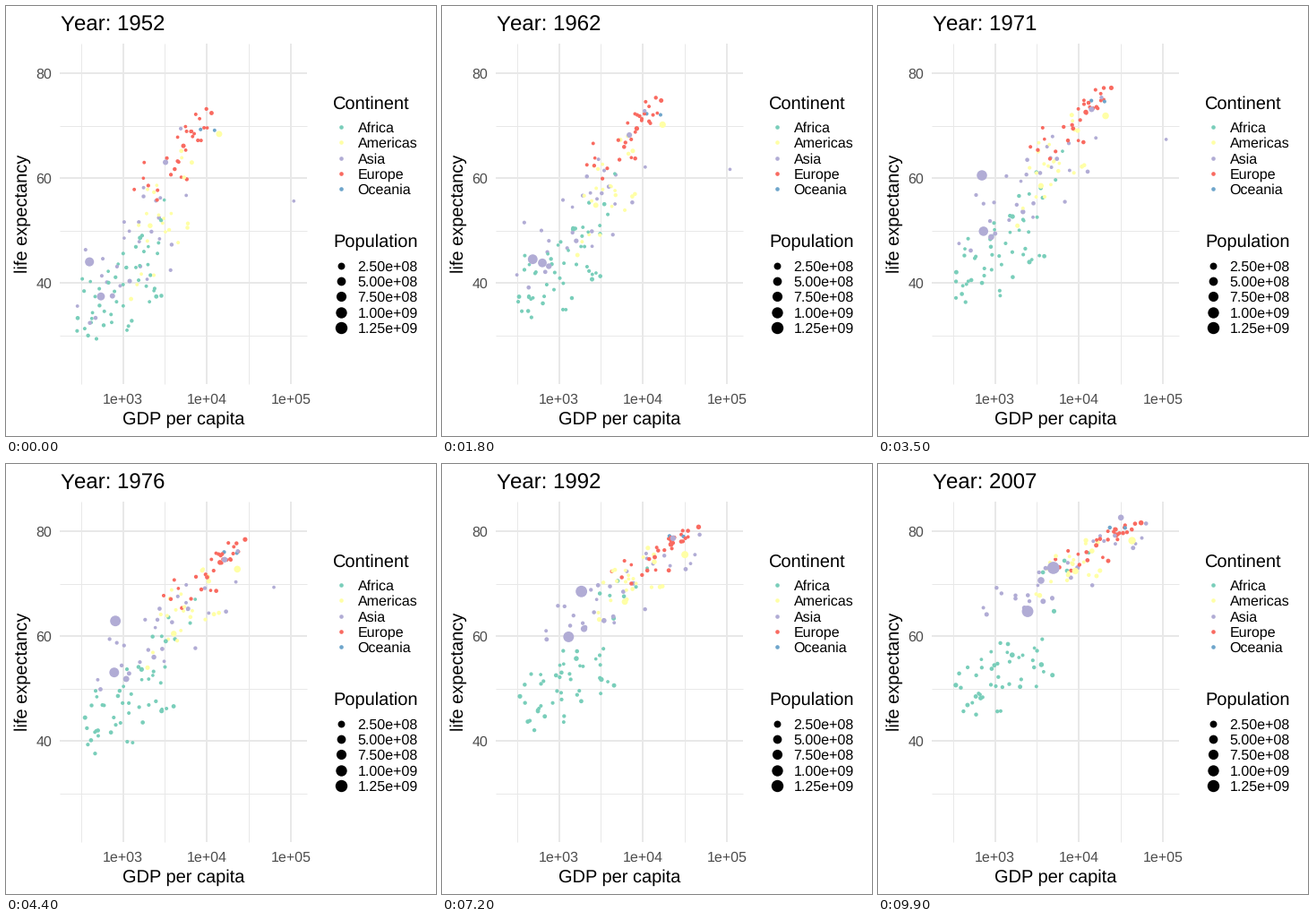
Write a matplotlib script that moves like this. It is 480 by 480 pixels and loops after 10 s.

```python
import numpy as np
import matplotlib.pyplot as plt
from matplotlib.animation import FuncAnimation

plt.rcParams.update({"font.family": "Liberation Sans", "text.hinting": "none"})

FRAMES = 100
YEARS = np.arange(1952, 2008, 5)
COLORS = {
    "Africa": "#79ceba",
    "Americas": "#ffffa6",
    "Asia": "#b1acd5",
    "Europe": "#f96a60",
    "Oceania": "#6ea5cb",
}
GREY = "#e8e8e8"

# Regions: continent, countries, mean (log GDP, life) in the first and last
# year, and the spread of both.
REGIONS = [
    ("Africa", 46, (2.97, 38.5), (3.12, 53), (.31, 6)),
    ("Africa", 6, (3.27, 46), (3.82, 73.3), (.14, 4.5)),
    ("Americas", 23, (3.47, 52), (3.90, 73.3), (.22, 7.5)),
    ("Asia", 20, (3.02, 44.5), (3.50, 69), (.33, 7)),
    ("Asia", 8, (3.42, 54), (4.47, 78.4), (.22, 8)),
    ("Europe", 18, (3.84, 68.2), (4.49, 79.9), (.13, 2.7)),
    ("Europe", 12, (3.48, 61), (4.06, 75.1), (.21, 3.8)),
    ("Oceania", 2, (4.01, 69.2), (4.47, 80.7), (.05, .4)),
]

# Countries that stand out: continent, population in millions in the first and
# last year, and key points (year, GDP per capita, life expectancy).
STANDOUTS = [
    ("Americas", (57, 190), [(1952, 2109, 50.9), (2007, 9066, 72.4)]),
    ("Asia", (556, 1319), [(1952, 400, 44), (1962, 488, 44.5),
                           (1967, 613, 58.4), (1982, 962, 65.5),
                           (2007, 4959, 73)]),
    ("Asia", (372, 1110), [(1952, 547, 37.4), (1982, 856, 56.6),
                           (2007, 2452, 64.7)]),
    ("Asia", (82, 223), [(1952, 750, 37.5), (1967, 762, 46),
                         (2007, 3541, 70.6)]),
    ("Asia", (86, 127), [(1952, 3217, 63), (1972, 14779, 73.4),
                         (2007, 31656, 82.6)]),
    ("Asia", (1, 2), [(1952, 108382, 55.6), (1972, 109348, 67.7),
                      (1982, 31354, 71.3), (2007, 47307, 77.6)]),
    ("Americas", (157, 301), [(1952, 13990, 68.4), (2007, 42952, 78.2)]),
]

rng = np.random.default_rng(7)


def drifting(n, step=.1):
    """Standard scores of n countries that wander a little every five years."""
    start = rng.permutation(np.linspace(-1.6, 1.6, n))[:, None]
    return start + np.cumsum(rng.normal(0, step, (n, len(YEARS))), axis=1)


def ramp(first, last):
    return np.linspace(first, last, len(YEARS))


def region(cont, n, start, end, spread):
    """Countries around a mean that rises fast at first, then levels off."""
    rise = 1 - (1 - ramp(0, 1)) ** 1.5
    gdp, life = (a + (b - a) * rise for a, b in zip(start, end))
    shrink = (85 - life) / (85 - start[1])
    u = drifting(n)
    x = gdp + spread[0] * u
    y = life + spread[1] * shrink * (.6 * u + .8 * drifting(n))
    pop = np.minimum(7 * np.exp(rng.normal(size=n)), 50)
    return [(cont, x[k], y[k], pop[k] * ramp(.7, 1.6)) for k in range(n)]


def standout(cont, pop, points):
    year, gdp, life = np.transpose(points)
    return (cont, np.interp(YEARS, year, np.log10(gdp)),
            np.interp(YEARS, year, life), ramp(*pop))


def px(log_gdp):
    return 130.5 + 93.75 * (log_gdp - 3)


def py(life):
    return 75 + 5.85 * (80 - life)


def area(pop):
    """Marker area for a population in millions."""
    return (3.4 + 10.3 * np.sqrt(pop / 1319)) ** 2


crowd = [c for r in REGIONS for c in region(*r)]
rows = [crowd[k] for k in rng.permutation(len(crowd))]
rows += [standout(*s) for s in STANDOUTS]
gdp, life, pop = (np.array([r[k] for r in rows]) for k in (1, 2, 3))

fig = plt.figure(figsize=(480 / 72, 480 / 72), dpi=72, facecolor="white")
ax = fig.add_axes([0, 0, 1, 1])
ax.set(xlim=(0, 480), ylim=(480, 0))
ax.axis("off")


def text(x, y, s, size=16, **kw):
    return ax.text(x, y, s, fontsize=size, va="baseline", **kw)


def grid(logs, lives, width):
    style = dict(color=GREY, lw=width, zorder=1)
    ax.vlines([px(v) for v in logs], 42, 421.5, **style)
    ax.hlines([py(v) for v in lives], 60, 335.5, **style)


grid([2.5, 3.5, 4.5], [30, 50, 70], .97)
grid([3, 4, 5], [40, 60, 80], 1.94)
for k in (3, 4, 5):
    text(px(k), 444, f"1e+0{k}", ha="center", color="#4d4d4d")
for v in (40, 60, 80):
    text(51, py(v) + 5.8, str(v), ha="right", color="#4d4d4d")
text(198, 466.5, "GDP per capita", 20, ha="center")
text(24, 232, "life expectancy", 20, ha="center", rotation=90,
     rotation_mode="anchor")

text(365, 115, "Continent", 20)
for k, (name, color) in enumerate(COLORS.items()):
    y = 135 + 17.3 * k
    ax.scatter(374, y, s=4.6 ** 2, c=color, linewidths=0)
    text(392.5, y + 5.8, name)

text(365, 269, "Population", 20)
for k in range(5):
    y, millions = 289.7 + 17.3 * k, 250 * (k + 1)
    ax.scatter(374, y, s=area(millions), c="black", linewidths=0)
    text(392.5, y + 5.8, f"{millions * 1e6:.2e}")

# The Y stands alone so that the title is set without kerning.
text(60, 28, "Y", 24)
title = text(76, 28, "", 24)
dots = ax.scatter(px(gdp[:, 0]), py(life[:, 0]), s=area(pop[:, 0]),
                  c=[COLORS[r[0]] for r in rows], linewidths=0, zorder=3)


def draw(i):
    t = i / (FRAMES - 1) * (len(YEARS) - 1)
    k = min(int(t), len(YEARS) - 2)
    x, y, p = (a[:, k] + (t - k) * (a[:, k + 1] - a[:, k])
               for a in (gdp, life, pop))
    dots.set_offsets(np.column_stack([px(x), py(y)]))
    dots.set_sizes(area(p))
    title.set_text(f"ear: {round(1952 + 5 * t)}")
    return dots, title


anim = FuncAnimation(fig, draw, frames=FRAMES, interval=100, repeat=True)
plt.show()
```
